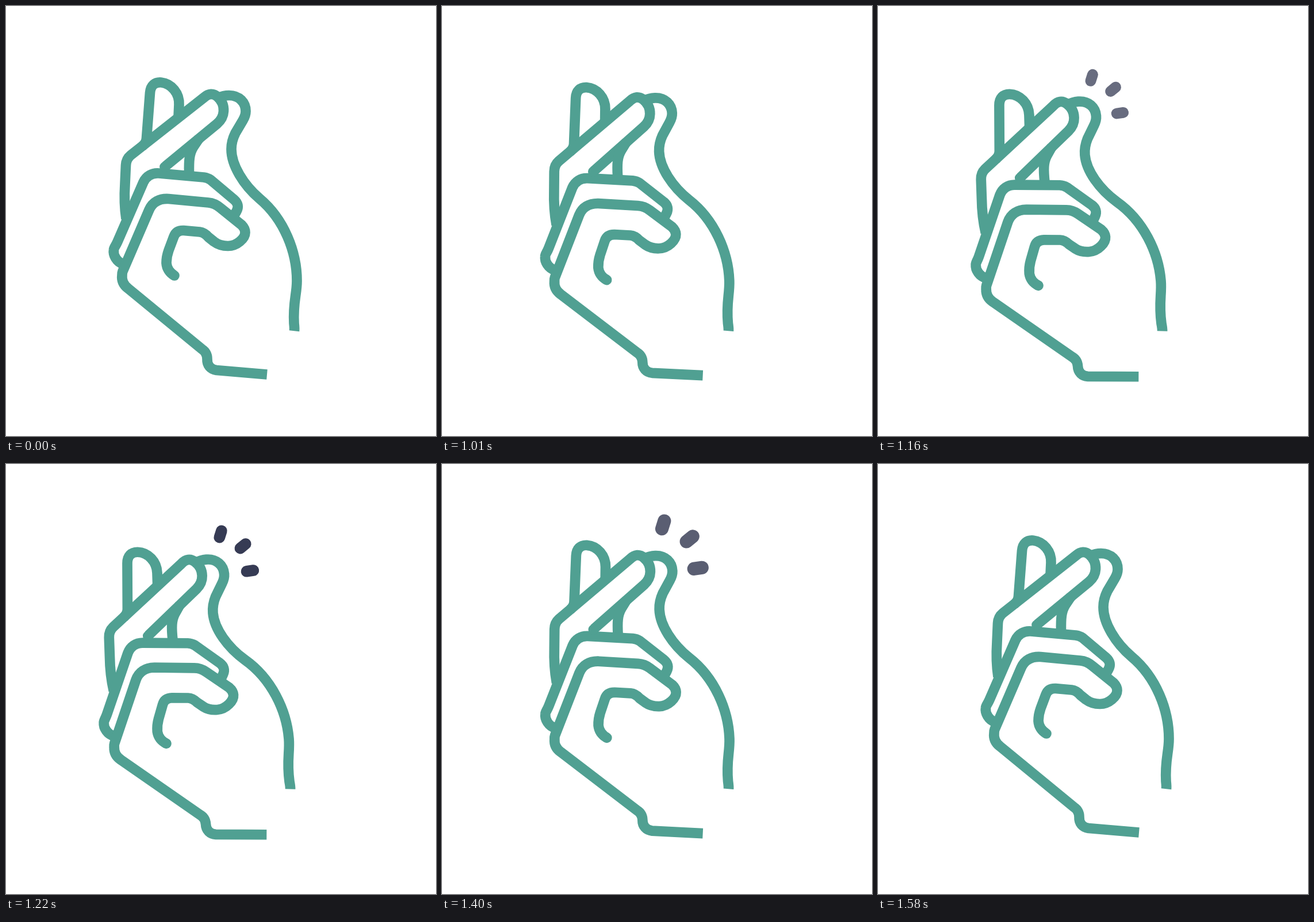
An HTML page with a canvas for the animation above (4880 ms loop, 748x748 px).

```html
<!DOCTYPE html>
<html lang="en">
<head>
<meta charset="utf-8">
<title>Finger snap</title>
<style>
  html, body { margin: 0; width: 100%; height: 100%; overflow: hidden; background: #fff; }
  canvas { display: block; width: 100vw; height: 100vh; }
</style>
</head>
<body>
<canvas id="stage" width="748" height="748"></canvas>
<script>
const SIZE = 748, LOOP = 4880, START = 890, STEP = 30, LAST = 23;
const GREEN = '#50a092', NAVY = '#363b54';
const PIVOT = [500, 651];
const ctx = document.getElementById('stage').getContext('2d');

const hand = [
  // thumb and wrist
  'M368 160C375 157 380 155.500 388 155.500C406 155.500 417 168 417 183C417 189 415 194 412 199L399 221' +
    'C394 231 392 239 392 249C392 277 413 311 441 335C484 371 506 428 506 478' +
    'C506 502 499 515 501 552Q502 561 501.500 565.300',
  // index finger
  'M237 244Q244 238 244.500 230L250.500 151C251.500 138 259 132 270 133C288 135 302 152 301 172L300 193',
  // middle finger
  'M209 370C206 350 206 325 207 310L208.500 277Q209 266 217 259.500L344 159.500Q357 148 368 158' +
    'C377 166 379 175 378.500 183C378 193 374 199 367 205L277 279',
  'M318.500 291C318 268 319 256 326 245L336 230',
  // ring finger
  'M204 449C192 445 186 433 187.500 424C187.800 420 190.500 418 194 410L239 306.500' +
    'C244 296 254 290 266 291L344 298Q351 299 356 302.500L397 337Q407 346 401 357L397 364',
  // little finger and palm
  'M454 641L366 633.500C356 632 349.500 625 350 614C350 607 347 601 341 597L212 491' +
    'C203 484 201 476 202 468Q202 464 203 461.500L249 354.500C255 341 267 334.500 283 335.500' +
    'L352 342Q363 343 372 350.500L410 381Q416 387 416 394C416 404 402 417.500 386 417.500' +
    'C377 417.500 370 416 362 410L352 402Q345 394 337 393L309 390.500Q296 390 292 401' +
    'L283 425C279 436 279 441 279 447Q280 461 293 469'
].map(d => new Path2D(d));

// centre and half-length vector of each spark
const sparks = [
  [0, 0, 1.7, -5.4],
  [36.7, 19.6, 4.4, -3.6],
  [48.3, 60.2, 5.6, -0.8]
];

const angleKeys = [[0, 0], [10, -5.15], [14, -3.05], [19, -1.28], [LAST, 0]];
const scaleKeys = [[7, 1], [10, 1.03], [LAST, 1.446]];
const xKeys = [[7, 372.5], [10, 371.2], [LAST, 396.2]];
const yKeys = [[7, 125], [10, 124.7], [LAST, 89.7]];
const alphaKeys = [[6, 0], [10, 1], [16, 1], [21.5, 0]];

function at(keys, k) {
  if (k <= keys[0][0]) return keys[0][1];
  for (let i = 1; i < keys.length; i++) {
    const [a, u] = keys[i - 1], [b, v] = keys[i];
    if (k <= b) return u + (v - u) * (k - a) / (b - a);
  }
  return keys[keys.length - 1][1];
}

function drawHand(k) {
  ctx.save();
  ctx.translate(...PIVOT);
  ctx.rotate(at(angleKeys, k) * Math.PI / 180);
  ctx.translate(-PIVOT[0], -PIVOT[1]);
  ctx.strokeStyle = ctx.fillStyle = GREEN;
  ctx.lineWidth = 17.7;
  ctx.lineCap = 'butt';
  ctx.lineJoin = 'round';
  hand.forEach(p => ctx.stroke(p));
  // rounded line ends
  for (const [x, y] of [[293, 469], [276, 280]]) {
    ctx.beginPath();
    ctx.arc(x, y, 8.85, 0, Math.PI * 2);
    ctx.fill();
  }
  ctx.restore();
}

function drawSparks(k) {
  const alpha = at(alphaKeys, k);
  if (!alpha) return;
  const s = at(scaleKeys, k);
  ctx.save();
  ctx.globalAlpha = alpha;
  ctx.translate(at(xKeys, k), at(yKeys, k));
  ctx.scale(s, s);
  ctx.strokeStyle = NAVY;
  ctx.lineWidth = 18.5;
  ctx.lineCap = 'round';
  for (const [x, y, dx, dy] of sparks) {
    ctx.beginPath();
    ctx.moveTo(x - dx, y - dy);
    ctx.lineTo(x + dx, y + dy);
    ctx.stroke();
  }
  ctx.restore();
}

function render() {
  const t = performance.now() % LOOP;
  const k = Math.min(LAST, Math.max(0, Math.floor((t - START) / STEP)));
  ctx.fillStyle = '#fff';
  ctx.fillRect(0, 0, SIZE, SIZE);
  drawHand(k);
  drawSparks(k);
  requestAnimationFrame(render);
}
render();
</script>
</body>
</html>
```
